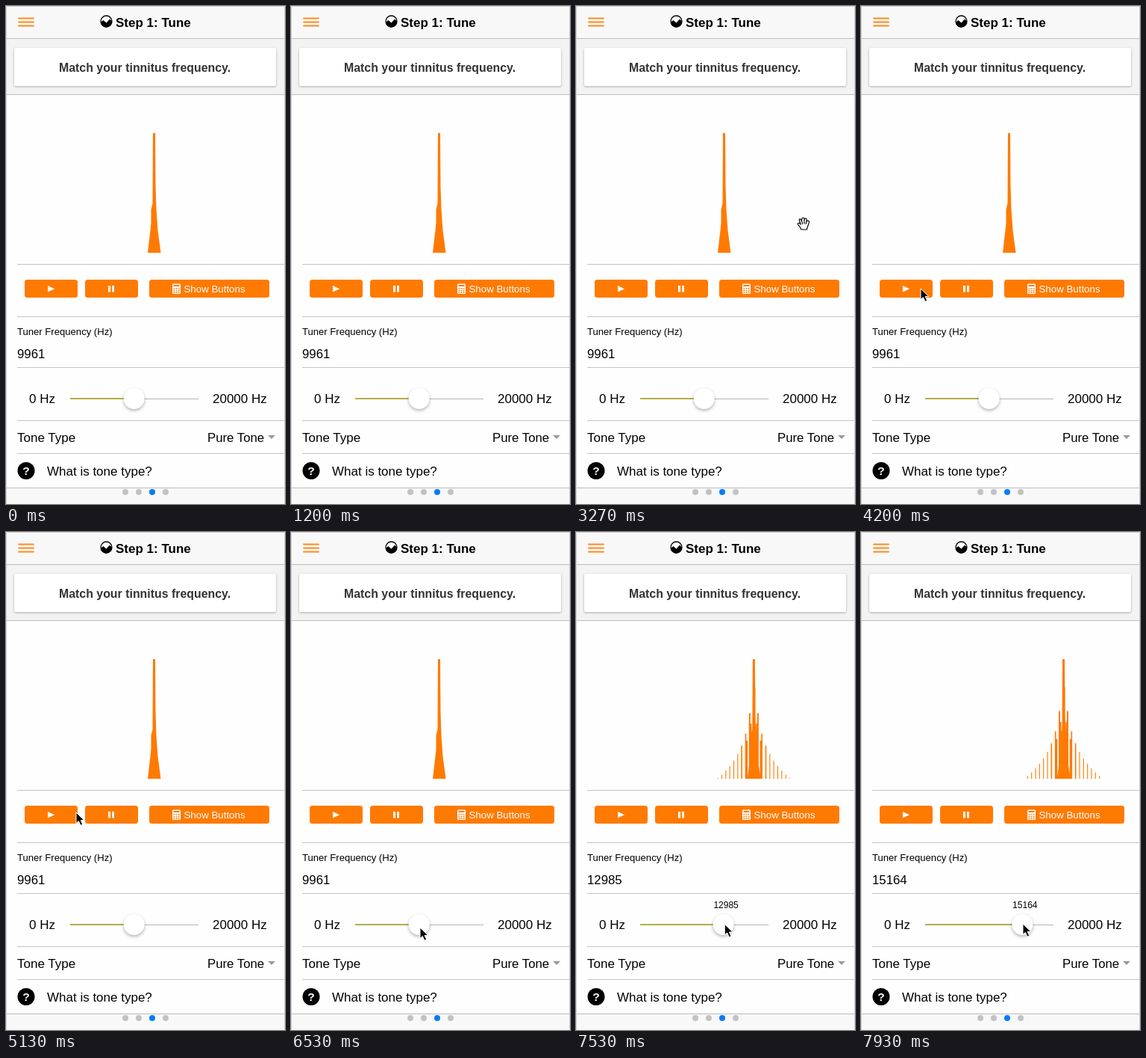
These frames come from a looping animation (374x666 px, 8000 ms). An HTML page:

```html
<!DOCTYPE html>
<html lang="en">
<head>
<meta charset="utf-8">
<title>Tune</title>
<style>
html, body { margin: 0; width: 100%; height: 100%; overflow: hidden; background: #fff; }
svg { display: block; width: 374px; height: 666px; font: 17px "Liberation Sans", Arial, sans-serif; }
.accent { fill: #ff7a00; }
.rule { stroke: #c4c4c4; }
.bold { font-weight: bold; }
.mid { text-anchor: middle; }
.card { filter: drop-shadow(0 1px 1.5px rgba(0,0,0,.3)); }
.knob { filter: drop-shadow(0 2px 2px rgba(0,0,0,.3)); }
</style>
</head>
<body>
<svg viewBox="0 0 374 666">
  <rect width="374" height="666" fill="#fefefe"/>
  <rect width="374" height="43" fill="#f8f8f8"/>
  <rect y="44" width="374" height="74" fill="#f3f3f3"/>
  <rect y="645" width="374" height="21" fill="#f8f8f8"/>
  <path d="M0 43.5H374M0 118.5H374M0 644.5H374" stroke="#bcbcbc"/>
  <path class="rule" d="M15 345.5H374M15 415.5H374M15 483.5H374M15 554.5H374M15 598.5H374"/>
  <path d="M.5 666V.5H373.5V666" fill="none" stroke="#d2d2d2"/>

  <path d="M17 16.5H37M17 21.5H37M17 26.5H37" stroke="#ff8a1c" stroke-width="1.8" stroke-linecap="round"/>
  <circle cx="134.5" cy="20.5" r="7.5" fill="#fff" stroke="#000" stroke-width="1.3"/>
  <path d="M127 21.5L130.5 19L134.5 22.5L139 17.5L142 20.5A7.5 7.5 0 0 1 127 21.5Z"/>
  <text x="147" y="28" class="bold">Step 1: Tune</text>

  <rect class="card" x="11" y="56" width="351" height="51" rx="2" fill="#fff"/>
  <text x="71" y="88" class="bold" font-size="15.9" fill="#333">Match your tinnitus frequency.</text>

  <path id="spectrum" class="accent"/>

  <g class="accent">
    <rect x="25" y="366" width="71" height="24" rx="3.5"/>
    <rect x="106" y="366" width="71" height="24" rx="3.5"/>
    <rect x="192" y="366" width="161" height="24" rx="3.5"/>
  </g>
  <path d="M56 374L65 378.3L56 382.6ZM137 374h3v8.5h-3ZM142 374h3v8.5h-3Z" fill="#fff"/>
  <rect x="223" y="371.5" width="11" height="13.5" rx="1" fill="#fff"/>
  <path d="M224.5 374H232.5" stroke="#ff7a00" stroke-width="2"/>
  <path d="M224.5 378H232.5M224.5 380.7H232.5M224.5 383.3H232.5" stroke="#ff7a00" stroke-width="1.5" stroke-dasharray="1.8 1.3"/>
  <text x="238.5" y="383" font-size="13.3" fill="#fff">Show Buttons</text>

  <text x="15" y="440" font-size="13.1">Tuner Frequency (Hz)</text>
  <text id="value" x="15" y="471" font-size="16.8"></text>
  <text id="tip" y="503" class="mid" font-size="12"></text>
  <text x="31" y="531">0 Hz</text>
  <text x="277" y="531">20000 Hz</text>
  <path d="M86 525.5H258" stroke="#b6b6b6"/>
  <path id="track" stroke="#aa9d1c" stroke-width="1.5"/>
  <circle id="knob" class="knob" cy="525" r="14" fill="#fff"/>

  <text x="15" y="583">Tone Type</text>
  <text x="270" y="583" font-size="16.8">Pure Tone</text>
  <path d="M351 574H361L356 579Z" fill="#999"/>
  <circle cx="27" cy="621.5" r="11.5"/>
  <text x="27" y="627" class="mid bold" font-size="15.5" fill="#fff">?</text>
  <text x="55" y="628">What is tone type?</text>
  <g fill="#c2c2c2">
    <circle cx="160" cy="650" r="4"/><circle cx="178" cy="650" r="4"/>
    <circle cx="196" cy="650" r="4" fill="#087cf5"/><circle cx="214" cy="650" r="4"/>
  </g>

  <path id="arrow" d="M0 0V14.5L3.3 11.5L6 17.3L8.7 16L6.1 10.5H10.8Z" stroke="#fff" stroke-width="1" stroke-linejoin="round"/>
  <g id="hand" fill="#fff" stroke="#000" stroke-width="1.15" stroke-linejoin="round" stroke-linecap="round">
    <path d="M-3 8L-5 4.2L-7.4 1.3Q-8.3-.6-6.6-.8Q-5.3-.8-3.7 1.2L-5.6-4Q-6-6-4.6-6.2Q-3.4-6.2-2.7-4L-2-5.8Q-2.2-8-.6-8Q.9-8 1-6L1.4-5.8Q2-7.5 3.4-6.9Q4.6-6.4 4.1-4L4.7-3.2Q6.2-4.8 7.2-3.4Q7.8-2.5 7 0L5.5 4.3L4.3 8Z"/>
    <path d="M-2.7-4L-1.3.3M1-6V0M4.1-4L3.3.5" fill="none"/>
  </g>
</svg>
<script>
const LOOP = 8000, STEP = 1000 / 15;
const el = id => document.getElementById(id);

// Rows: time, then values; linear between rows.
const POINTER = [
  [2470, 366, 268], [3000, 314, 287], [3266, 305, 291], [3400, 303, 293],
  [3750, 200, 340], [4130, 80, 378], [4900, 80, 378], [5133, 94, 375],
  [5450, 112, 402], [6000, 165, 516], [6260, 173, 529], [7000, 173, 529],
  [7200, 184.5, 525], [7933, 217, 524]
];
const FREQ = [[7066, 9961], [7200, 10861], [7460, 12500], [7800, 14750], [7933, 15164]];
const PEAK = [[7133, 198.5], [7200, 196.7], [7266, 211], [7460, 231], [7800, 265], [7866, 271.5]];
const SPREAD = [[7066, 9], [7200, 33], [7400, 48], [7933, 53]];

function at(rows, t) {
  if (t <= rows[0][0]) return rows[0].slice(1);
  const i = rows.findIndex(r => r[0] > t);
  if (i < 0) return rows[rows.length - 1].slice(1);
  const a = rows[i - 1], b = rows[i], k = (t - a[0]) / (b[0] - a[0]);
  return a.slice(1).map((v, j) => v + (b[j + 1] - v) * k);
}

const bar = (x, w, h) => `M${x - w / 2} 330v${-h}h${w}v${h}Z`;

function spectrum(x, spread) {
  let d = `M${x - 8.5} 330L${x - 5} 300L${x - 4} 290V272L${x - 2} 264L${x - 1.5} 170H${x + 1.5}L${x + 2} 240L${x + 3} 272L${x + 5} 300L${x + 9} 330Z`;
  if (spread < 10) return d;
  // Side lobes fall off logarithmically around the moving tone.
  const height = o => Math.max(0, 40 * Math.log(spread / o));
  for (let o = 5.5; o < spread; o += 5.33) {
    const w = o < 8 ? 2 : o < 18 ? 1.6 : 1.1;
    d += bar(x - o, w, height(o)) + bar(x + o, w, height(o));
    if (o < 14) for (const s of [-1, 1]) d += bar(x + s * (o - 1.6), 2, height(o) * .84);
  }
  return d + bar(x + 1.7, 1, 122) + bar(x, 7, 60);
}

function draw(t) {
  const freq = Math.round(at(FREQ, t)[0]);
  const knob = 86 + 172 * freq / 20000;
  const dragging = t > 7060;
  el("value").textContent = freq;
  el("tip").textContent = dragging ? freq : "";
  el("tip").setAttribute("x", knob + 3.4);
  el("knob").setAttribute("cx", knob);
  el("track").setAttribute("d", `M86 525H${knob}`);
  el("spectrum").setAttribute("d", spectrum(at(PEAK, t)[0], at(SPREAD, t)[0]));

  const [x, y] = at(POINTER, t);
  const shown = t > 2460, grab = y < 345;
  for (const [id, on] of [["hand", shown && grab], ["arrow", shown && !grab]]) {
    el(id).style.display = on ? "" : "none";
    el(id).setAttribute("transform", `translate(${x} ${y})`);
  }
}

function tick() {
  const t = performance.now() % LOOP;
  draw(Math.floor((t + 4) / STEP) * STEP % LOOP);
  requestAnimationFrame(tick);
}
tick();
</script>
</body>
</html>
```
